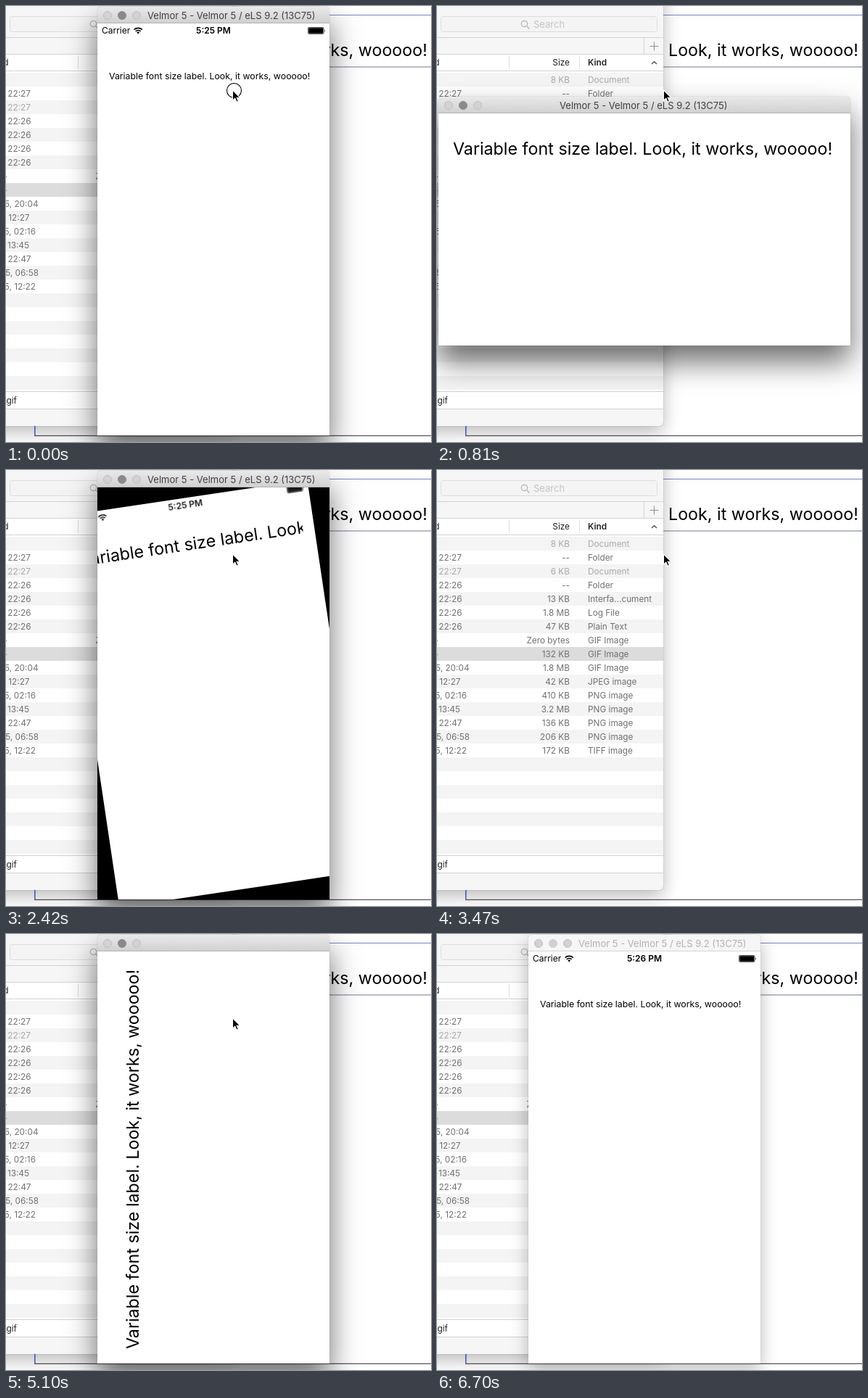
An HTML page for the animation above (6930 ms loop, 586x601 px).

```html
<!DOCTYPE html>
<html lang="en">
<head>
<meta charset="utf-8">
<title>Rotating label</title>
<style>
/* --p: 0 is landscape, 1 is portrait; --a: angle of the screen content */
@property --p { syntax: "<number>"; inherits: true; initial-value: 1; }
@property --a { syntax: "<angle>"; inherits: true; initial-value: 0deg; }

html, body { margin: 0; width: 100%; height: 100%; overflow: hidden; background: #fff; }
body { font-family: Inter, Roboto, sans-serif; }
#stage { position: absolute; left: 0; top: 0; width: 586px; height: 601px; overflow: hidden; }
#stage svg { position: absolute; overflow: visible; }
#stage * { animation-duration: 6930ms; animation-iteration-count: infinite; animation-timing-function: step-end; }

#finder {
  position: absolute; left: -60px; top: -30px; width: 372px; height: 609px;
  border-radius: 5px; background: #f6f6f6;
  box-shadow: 0 8px 24px rgba(0,0,0,.28), 0 0 1px rgba(0,0,0,.5);
}
#list text { font-size: 11.8px; fill: #707070; }
#list .dim { fill: #a8a8a8; }
#list .dark { fill: #222; }

#phone {
  position: absolute; border-radius: 5px 5px 0 0;
  box-shadow: var(--shade), 0 0 1px rgba(0,0,0,.5);
  animation-name: place, focus;
}
#bar {
  position: absolute; inset: 0 0 auto; height: 23px; box-sizing: border-box;
  border-radius: 5px 5px 0 0; border-bottom: 1px solid var(--edge); background: var(--bar);
}
#bar i {
  position: absolute; top: 6px; width: 12px; height: 12px; box-sizing: border-box;
  border-radius: 50%; border: 1px solid #c0c0c0; background: #d2d2d2;
}
#bar i:nth-child(1) { left: 8px; }
#bar i:nth-child(2) { left: 28px; border-color: var(--dot); background: var(--dot); }
#bar i:nth-child(3) { left: 48px; }
#bar b {
  position: absolute; left: var(--tx); top: 0; font: 13px/24px Inter, Roboto, sans-serif;
  white-space: nowrap; color: var(--ink); animation-name: title;
}
#body { position: absolute; inset: 23px 0 0; overflow: hidden; background: #000; }
#screen {
  position: absolute; left: 50%; top: 50%; background: #fff; overflow: hidden;
  width: calc(568px - 248px * var(--p)); height: calc(320px + 248px * var(--p));
  transform: translate(-50%, -50%) rotate(var(--a));
}
#stage #screen { animation-name: turn; animation-timing-function: linear; }
#status { position: absolute; inset: 0 0 auto; height: 20px; font-size: 12px; line-height: 20px; opacity: var(--p); }
#status span { position: absolute; left: 6px; }
#status .time { left: 0; right: 0; text-align: center; font-weight: 600; }
#early { animation-name: early; }
#late { animation-name: late; }
#label {
  position: absolute; overflow: hidden; white-space: nowrap; line-height: 40px;
  left: calc(20px - 4px * var(--p)); right: calc(20px - 4px * var(--p));
  top: calc(43.4px + 17px * var(--p) - .638em); animation-name: size;
}
#cursor { left: 312px; top: 115.5px; }
#stage #cursor { animation-name: leave; animation-timing-function: linear; }
#tap { animation-name: tap; }

@keyframes place {
  0%, 29.87%, 73.59% { left: 126px; top: 1px; width: 320px; height: 591px; --tx: 69px; opacity: 1; }
  6.49%, 50.07% { left: 2px; top: 125px; width: 568px; height: 343px; --tx: 167px; opacity: 0; }
  7.21%, 50.79% { left: 2px; top: 125px; width: 568px; height: 343px; --tx: 167px; opacity: 1; }
  100% { left: 126px; top: 1px; width: 320px; height: 591px; --tx: 69px; opacity: 1; }
}
@keyframes focus {
  0% {
    --shade: 0 22px 42px rgba(0,0,0,.58); --bar: linear-gradient(#e9e9e9, #d1d1d1);
    --edge: #b4b4b4; --dot: #8a8a8c; --ink: #404040;
  }
  96.68%, 100% {
    --shade: 0 8px 24px rgba(0,0,0,.28); --bar: linear-gradient(#f6f6f6, #f6f6f6);
    --edge: #d4d4d4; --dot: #d0d0d0; --ink: #b2b2b2;
  }
}
@keyframes title {
  0%, 8.08%, 31.16%, 51.51%, 74.31%, 100% { opacity: 1; }
  7.21%, 29.87%, 50.79%, 73.59% { opacity: 0; }
}
@keyframes turn {
  0%, 7.2% { --p: 1; --a: 0deg; }
  7.21% { --p: 1; --a: 90deg; animation-timing-function: ease-in-out; }
  11.54%, 29.86% { --p: 0; --a: 0deg; }
  29.87%, 30.74% { --p: 0; --a: -90deg; animation-timing-function: ease-in-out; }
  36.08%, 50.78% { --p: 1; --a: 0deg; }
  50.79% { --p: 1; --a: 90deg; animation-timing-function: ease-in-out; }
  55.27%, 73.58% { --p: 0; --a: 0deg; }
  73.59%, 73.73% { --p: 0; --a: -90deg; animation-timing-function: ease-in-out; }
  79.07%, 100% { --p: 1; --a: 0deg; }
}
@keyframes size {
  0%, 36.08%, 79.07%, 100% { font-size: 12.33px; }
  11.54%, 55.27% { font-size: 23.28px; }
}
@keyframes early { 0% { opacity: 1; } 73.59%, 100% { opacity: 0; } }
@keyframes late { 0% { opacity: 0; } 73.59%, 100% { opacity: 1; } }
@keyframes tap { 0% { opacity: 1; } .86%, 100% { opacity: 0; } }
@keyframes leave {
  0%, 83.69% { transform: none; }
  87.15%, 100% { transform: translate(252px, 492px); }
}
</style>
</head>
<body>
<div id="stage">
  <svg width="586" height="601">
    <path d="M40 12.5H586" stroke="#6f80e6"/>
    <path d="M39.8 12V592" stroke="#4c5ee0" stroke-width="1.5"/>
    <path d="M40 84H586" stroke="#74789a" stroke-width="1.2"/>
    <path d="M39 592.3H586" stroke="#555" stroke-width="1.2"/>
    <text x="319" y="69" font-size="23.28">Look, it works, wooooo!</text>
  </svg>

  <div id="finder"></div>
  <svg id="list" width="312" height="579">
    <rect x="5.5" y="14.5" width="298" height="21" rx="3" fill="#f4f4f4" stroke="#dcdcdc"/>
    <g fill="none" stroke="#b4b4b4" stroke-width="1.2">
      <circle cx="120.5" cy="24.5" r="4.2"/>
      <path d="M123.5 27.5l4 4"/>
    </g>
    <text x="133" y="29.8" style="font-size:13px;fill:#c4c4c4">Search</text>
    <path d="M0 67H312V531H0z" fill="#fff"/>
    <path d="M0 43.5H312M285.5 44V66M0 66.5H312M0 89.5H312" stroke="#d2d2d2"/>
    <path d="M99.5 69V87M196.5 69V87" stroke="#dedede"/>
    <path d="M293.5 55.5h12M299.5 49.5v12" stroke="#909090"/>
    <path d="M296 80l3.5-3.5l3.5 3.5" fill="none" stroke="#444" stroke-width="1.2"/>
    <text class="dark" x="3.5" y="82.3" text-anchor="end">d</text>
    <text class="dark" x="183" y="82.3" text-anchor="end">Size</text>
    <text class="dark" x="208" y="82.3" font-weight="600">Kind</text>
    <g id="rows"></g>
    <path d="M0 531H312V555H0z" fill="#fff"/>
    <path d="M0 531.5H312M0 555.5H312" stroke="#cfcfcf"/>
    <text class="dark" x="0.5" y="548.3">gif</text>
  </svg>

  <div id="phone">
    <div id="bar"><i></i><i></i><i></i><b>Velmor 5 - Velmor 5 / eLS 9.2 (13C75)</b></div>
    <div id="body">
      <div id="screen">
        <div id="status">
          <span>Carrier</span>
          <svg style="left:50px;top:5px" width="13" height="10" fill="none" stroke="#000" stroke-width="1.6">
            <path d="M.6 3.6a8.2 8.2 0 0 1 11.2 0M2.7 5.9a5.2 5.2 0 0 1 7 0"/>
            <path d="M6.2 9.4L4.3 7.5a2.8 2.8 0 0 1 3.8 0z" fill="#000" stroke="none"/>
          </svg>
          <span class="time" id="early">5:25 PM</span>
          <span class="time" id="late">5:26 PM</span>
          <svg style="right:5px;top:5px" width="25" height="10">
            <rect x=".5" y=".5" width="21.5" height="9" rx="1.5" fill="none" stroke="#000" stroke-width=".7"/>
            <rect x="1.3" y="1.3" width="20" height="7.4" rx=".8"/>
            <path d="M23 3.3q1.5 1.7 0 3.4z"/>
          </svg>
        </div>
        <div id="label">Variable font size label. Look, it works, wooooo!</div>
      </div>
    </div>
  </div>

  <svg id="cursor" width="20" height="20">
    <circle id="tap" cx="2.5" cy=".5" r="10" fill="none" stroke="#000" stroke-width="1.1"/>
    <path d="M.5 0V14.2L3.8 11.1L6 16.3L8.4 15.3L6.2 10.2H10.6z" stroke="#fff" stroke-width="1.1"/>
  </svg>
</div>

<script>
// date, right end of the date, size, kind
const files = [
  ["", 0, "8 KB", "Document"],
  ["22:27", 34, "--", "Folder"],
  ["22:27", 34, "6 KB", "Document"],
  ["22:26", 34.5, "--", "Folder"],
  ["22:26", 34.5, "13 KB", "Interfa…cument"],
  ["22:26", 34.5, "1.8 MB", "Log File"],
  ["22:26", 34.5, "47 KB", "Plain Text"],
  ["-", 2, "Zero bytes", "GIF Image"],
  ["-", 2, "132 KB", "GIF Image"],
  ["5, 20:04", 44.5, "1.8 MB", "GIF Image"],
  ["12:27", 32.5, "42 KB", "JPEG image"],
  ["5, 02:16", 41, "410 KB", "PNG image"],
  ["13:45", 32, "3.2 MB", "PNG image"],
  ["22:47", 34.5, "136 KB", "PNG image"],
  ["5, 06:58", 45, "206 KB", "PNG image"],
  ["5, 12:22", 41, "172 KB", "TIFF image"]
];
const selected = 8, dimmed = [0, 2];
let out = "";
for (let i = 0; i < 23; i += 2) {
  out += `<rect y="${92 + 19 * i}" width="312" height="19" fill="${i === selected ? "#dcdcdc" : "#f4f4f4"}"/>`;
}
files.forEach(([date, end, size, kind], i) => {
  const cell = (x, s, anchor) =>
    `<text x="${x}" y="${106.3 + 19 * i}" text-anchor="${anchor}"${dimmed.includes(i) ? ' class="dim"' : ""}>${s}</text>`;
  out += cell(end, date, "end") + cell(183, size, "end") + cell(208, kind, "start");
});
document.getElementById("rows").innerHTML = out;
</script>
</body>
</html>
```
